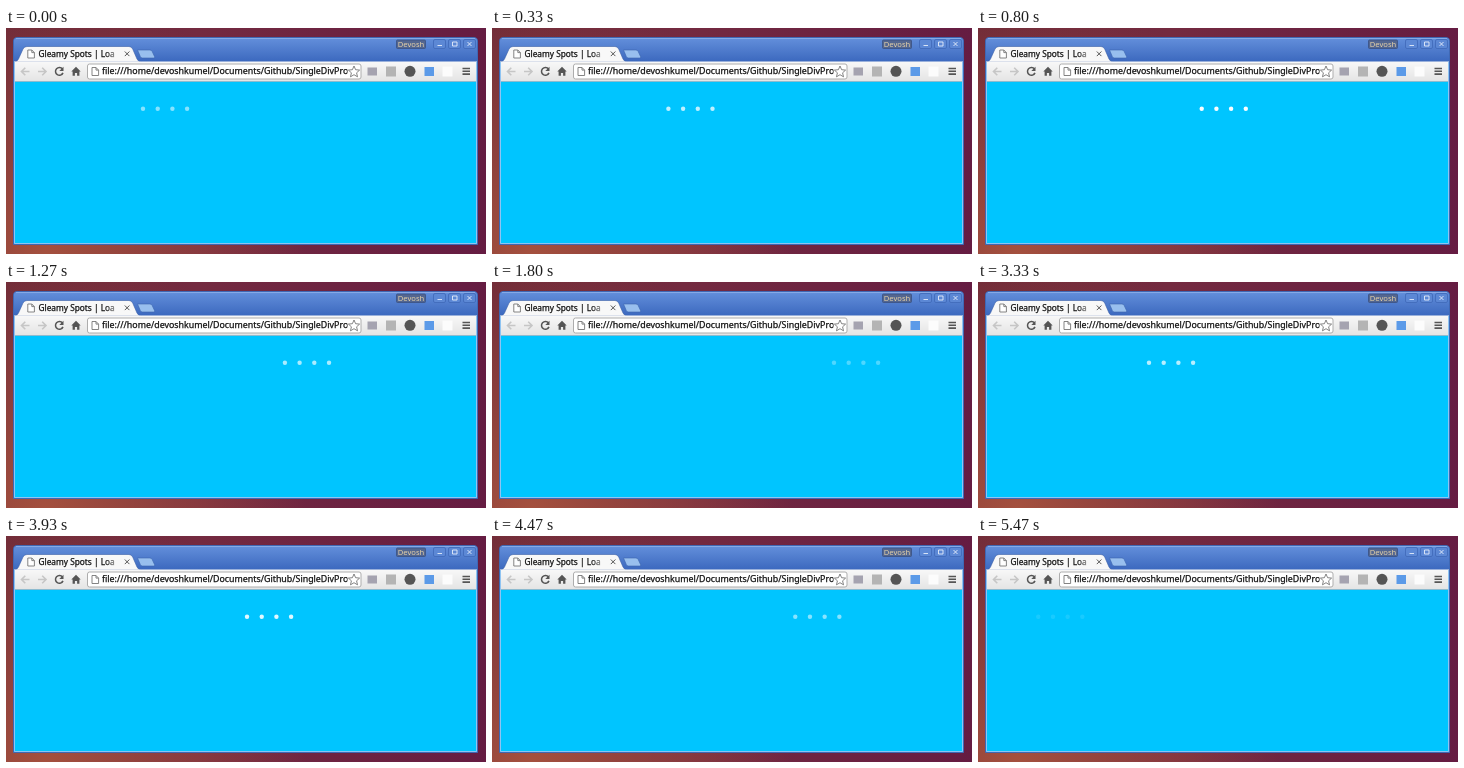
Recreate the animation shown at these times as an HTML page. Size 480x226 px, loop 5.54 s.

```html
<!DOCTYPE html>
<html lang="en">
<head>
<meta charset="utf-8">
<title>Loading dots</title>
<style>
  html, body { margin: 0; width: 100%; height: 100%; overflow: hidden; }
  svg { display: block; width: 480px; height: 226px; }
  text { font-family: "Noto Sans", "Open Sans", sans-serif; stroke-width: 0.25px; }
</style>
</head>
<body>
<svg viewBox="0 0 480 226">
  <defs>
    <linearGradient id="desk">
      <stop offset="0" stop-color="#6c2838"/>
      <stop offset="0.4" stop-color="#742a40"/>
      <stop offset="1" stop-color="#651c42"/>
    </linearGradient>
    <radialGradient id="glow" gradientUnits="userSpaceOnUse" cx="40" cy="226" r="260">
      <stop offset="0" stop-color="#a4503e"/>
      <stop offset="1" stop-color="#a4503e" stop-opacity="0"/>
    </radialGradient>
    <linearGradient id="bar" x2="0" y2="1">
      <stop offset="0" stop-color="#638fdb"/>
      <stop offset="1" stop-color="#3b68be"/>
    </linearGradient>
    <linearGradient id="tools" x2="0" y2="1">
      <stop offset="0" stop-color="#f8f8f8"/>
      <stop offset="1" stop-color="#e4e4e4"/>
    </linearGradient>
    <linearGradient id="fade" gradientUnits="userSpaceOnUse" x1="98" x2="114" y1="0" y2="0">
      <stop offset="0" stop-color="#111"/>
      <stop offset="1" stop-color="#111" stop-opacity="0.1"/>
    </linearGradient>
    <clipPath id="address"><path d="M94 36h247.500v15H94z"/></clipPath>
    <g id="page" fill="#fff" stroke="#777" stroke-width="0.9">
      <path d="M0 0h4l2.600 2.600V8H0zM4 0v2.600h2.600"/>
    </g>
  </defs>

  <rect width="480" height="226" fill="url(#desk)"/>
  <rect width="480" height="226" fill="url(#glow)"/>

  <!-- window frame -->
  <path d="M7.500 216.500V13q0-3.500 3.500-3.500h457q3.500 0 3.500 3.500v203.500z" fill="#4b78c8" stroke="#3f68b4"/>
  <path d="M8 34V13q0-3 3-3h457q3 0 3 3v21z" fill="url(#bar)"/>
  <path d="M10 10.500h459" stroke="#86aae6"/>

  <!-- user label and window buttons -->
  <rect x="390.500" y="12" width="29" height="8.500" rx="1" fill="#536690" stroke="#3a5182" stroke-width="0.8"/>
  <text x="405" y="19" font-size="7.600" text-anchor="middle" fill="#e8d3a8">Devosh</text>
  <g fill="#5c88d5" stroke="#3f69b8" stroke-width="0.8">
    <rect x="427.500" y="11.500" width="12" height="9" rx="1.500"/>
    <rect x="442.500" y="11.500" width="12" height="9" rx="1.500"/>
    <rect x="457.500" y="11.500" width="12" height="9" rx="1.500"/>
  </g>
  <path d="M431.500 17.500h4.500M446.500 14h4.500v4h-4.500zM461.500 14l4 4m0-4l-4 4" fill="none" stroke="#e6eefa" stroke-width="0.900"/>

  <!-- tabs -->
  <path d="M8 34q3 0 4.500-3l4.500-10q1.200-2.500 4-2.500h102q2.500 0 3.700 2.500l4.300 10q1.500 3 4.500 3z" fill="#f8f8f8" stroke="#3b60a8" stroke-width="0.6"/>
  <path d="M131.500 22h12.500q1.500 0 2.200 1.500l2.300 5q.600 1.500-1 1.500h-11q-1.500 0-2.200-1.500l-2.800-6.500z" fill="#98bfee" stroke="#3c63ad" stroke-width="0.6"/>
  <use href="#page" x="21.800" y="22"/>
  <text x="32.500" y="29" font-size="8.300" fill="url(#fade)" stroke="url(#fade)">Gleamy Spots | Loa</text>
  <path d="M118.800 23.500l4.600 4.600m0-4.600l-4.600 4.600" stroke="#555"/>

  <!-- toolbar -->
  <rect x="8" y="33.500" width="463" height="20" fill="url(#tools)"/>
  <path d="M23.500 43.500h-8m3.800-3.700l-3.800 3.700 3.800 3.700M32 43.500h8m-3.800-3.700l3.800 3.700-3.800 3.700" fill="none" stroke="#c6c6c6" stroke-width="1.600"/>
  <path d="M56.500 41a3.900 3.900 0 1 0 .500 3.900" fill="none" stroke="#555" stroke-width="1.500"/>
  <path d="M57.500 38.800v4.200h-4.200z" fill="#555"/>
  <path d="M70 38.800l4.700 4.600h-1.300v4.300h-2.300v-2.800h-2.200v2.800h-2.300v-4.300h-1.300z" fill="#555"/>
  <rect x="81.500" y="36" width="273.500" height="15" rx="2" fill="#fff" stroke="#adadad"/>
  <use href="#page" x="86" y="39.500"/>
  <text x="96" y="46.300" font-size="8.850" fill="#111" stroke="#111" clip-path="url(#address)">file:///home/devoshkumel/Documents/Github/SingleDivPro</text>
  <path d="M348 38l1.600 3.700 4 .4-3 2.700.9 4-3.500-2.100-3.500 2.100.9-4-3-2.700 4-.4z" fill="#fff" stroke="#666" stroke-width="0.800"/>
  <rect x="361.500" y="39.500" width="9.500" height="8" fill="#a5a3b0"/>
  <rect x="380" y="38.500" width="10" height="10" fill="#b4b4b4"/>
  <circle cx="404" cy="43.300" r="5.500" fill="#555"/>
  <rect x="418.500" y="39" width="9.500" height="9" fill="#5b9ae8"/>
  <rect x="436.500" y="38.500" width="10" height="10" fill="#fcfcfc"/>
  <path d="M456.500 40.500h7.500m-7.500 2.800h7.500m-7.500 2.800h7.500" stroke="#555" stroke-width="1.600"/>

  <!-- page -->
  <rect x="8" y="53.500" width="463" height="162.500" fill="#00c5ff"/>
  <path d="M8.500 34v181.500h462V34" fill="none" stroke="#8fc4f2"/>
  <path d="M9 53.500h461" stroke="#a9bcc5" stroke-width="0.700"/>
  <g id="dots" fill="#fff">
    <circle r="2.200"/>
    <circle cx="14.700" r="2.200"/>
    <circle cx="29.400" r="2.200"/>
    <circle cx="44.100" r="2.200"/>
  </g>
</svg>
<script>
  const LOOP = 5540, STEP = 200 / 3;
  const MIDDLE = 220, REACH = 177;
  // [step, x] of the first dot; it pauses briefly, then re-enters twice
  const path = [
    [0, 137], [5, 176.4], [6, 176.4], [27, 342], [34, 397],
    [35, 52], [50, 171], [70, 326.6], [80, 404], [81, 52.5], [83, 68]
  ];
  const dots = document.getElementById("dots");

  function xAt(step) {
    const i = path.findIndex(p => p[0] > step);
    const [n0, x0] = path[i - 1], [n1, x1] = path[i];
    return x0 + (x1 - x0) * (step - n0) / (n1 - n0);
  }

  function draw(now) {
    const step = Math.min(82, Math.floor((now % LOOP + 3.5) / STEP));
    const x = xAt(step);
    dots.setAttribute("transform", `translate(${x} 80.8)`);
    dots.setAttribute("opacity", Math.max(0, 1 - Math.abs(x - MIDDLE) / REACH));
    requestAnimationFrame(draw);
  }
  draw(0);
</script>
</body>
</html>
```
